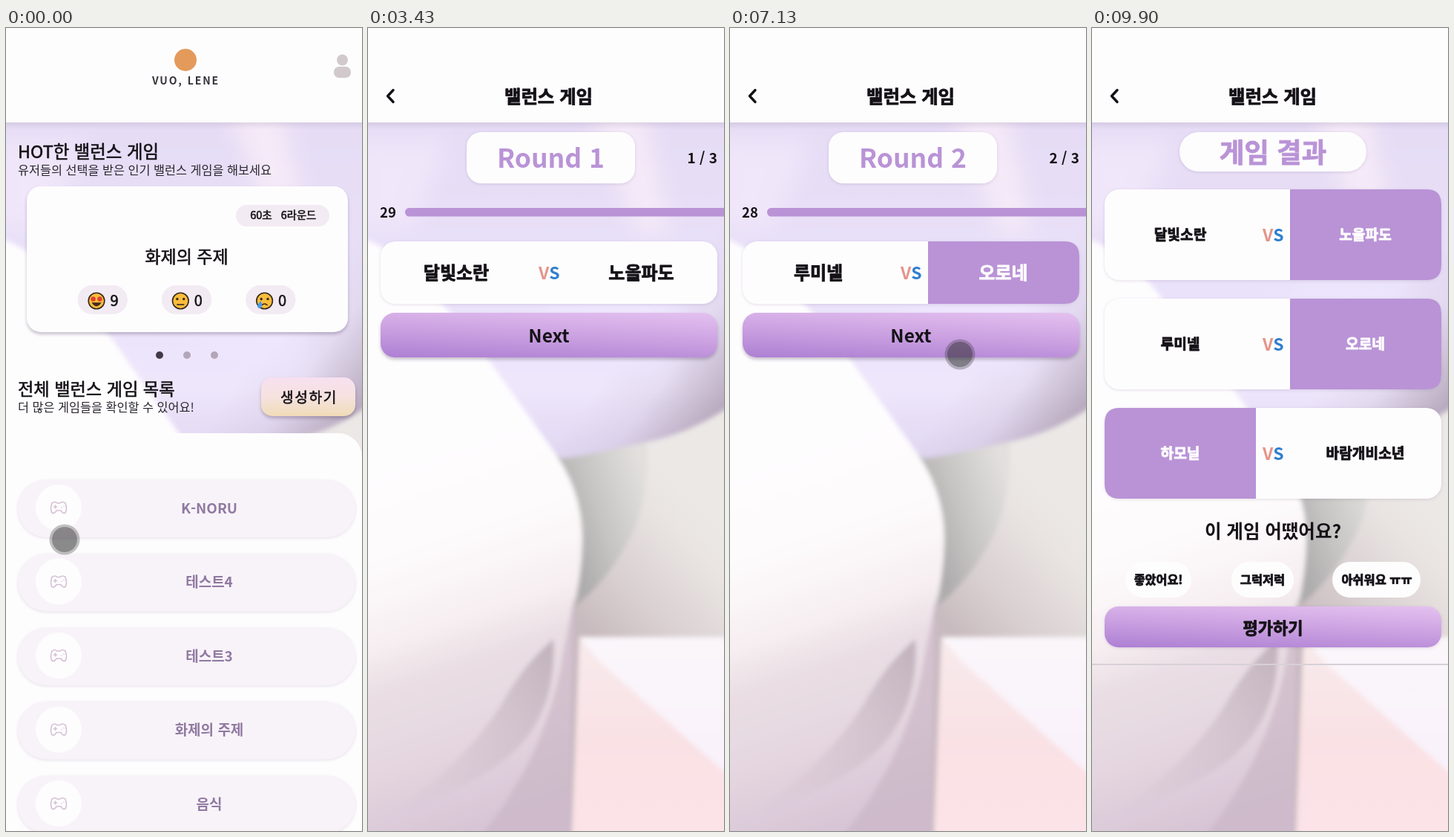
These frames come from a looping animation (480 by 1080 pixels, 9.93 s). An HTML page:

```html
<!DOCTYPE html>
<html lang="ko">
<head>
<meta charset="utf-8">
<title>밸런스 게임</title>
<style>
html, body { margin: 0; width: 100%; height: 100%; overflow: hidden; background: #fefdfe; }
svg { display: block; width: 100%; height: 100%; }
text { font-family: "Noto Sans CJK KR", "Noto Sans CJK", "Noto Sans", sans-serif; text-anchor: middle; white-space: pre; stroke-linejoin: round; }
.sh { filter: drop-shadow(0 1.5px 2px rgba(80, 50, 100, .15)); }
.deep { filter: drop-shadow(0 3px 2px rgba(60, 40, 80, .28)); }
</style>
</head>
<body>
<svg id="stage" viewBox="0 0 480 1080" preserveAspectRatio="none"></svg>
<script>
const LILAC = '#b993d6', MAUVE = '#9079a2', INK = '#151217', WHITE = '#fefdfe';
const LOOP = 9930;

// Drawing helpers
const rect = (x, y, x2, y2, r, fill, cls = '') =>
  `<rect x="${x}" y="${y}" width="${x2 - x}" height="${y2 - y}" rx="${r}" fill="${fill}" class="${cls}"/>`;
const circle = (x, y, r, fill, more = '') => `<circle cx="${x}" cy="${y}" r="${r}" fill="${fill}" ${more}/>`;
const path = (d, fill, more = '') => `<path d="${d}" fill="${fill}" ${more}/>`;
const line = (d, color, w, more = '') =>
  path(d, 'none', `stroke="${color}" stroke-width="${w}" stroke-linecap="round" stroke-linejoin="round" ${more}`);
// Medium and black weights get a thin outline, as only regular and bold exist
const OUTLINE = { 500: .6, 900: .8 };
const text = (s, x, cy, size, fill = INK, weight = 700, more = '') =>
  `<text x="${x}" y="${cy + size * .37}" font-size="${size}" fill="${fill}" font-weight="${weight}" ` +
  `stroke="${fill}" stroke-width="${OUTLINE[weight] || 0}" ${more}>${s}</text>`;
const LEFT = 'style="text-anchor:start"', RIGHT = 'style="text-anchor:end"';
const grad = (id, stops, dir = 'x2="0" y2="1"') => `<linearGradient id="${id}" ${dir}>` +
  stops.map(([o, c, a = 1]) => `<stop offset="${o}" stop-color="${c}" stop-opacity="${a}"/>`).join('') + '</linearGradient>';
const span = (x1, y1, x2, y2) => `gradientUnits="userSpaceOnUse" x1="${x1}" y1="${y1}" x2="${x2}" y2="${y2}"`;

const defs = `<defs>
  ${grad('btn', [[0, '#e4c1f0'], [.5, '#cba1e1'], [1, '#ad7fd3']], 'x1="1" y1="0" x2=".58" y2="1.2"')}
  ${grad('make', [[0, '#f7e0ef'], [.5, '#f6e2df'], [1, '#f0dcb8']])}
  ${grad('sky', [[0, '#e5dcf4'], [.45, '#e9e1f9'], [.8, '#eee6fb'], [1, '#e0d6f1']])}
  ${grad('edge', [[0, '#a393a6', 0], [.4, '#a393a6', .12], [1, '#a393a6', .8]], span(350, 430, 480, 530))}
  ${grad('wall', [[0, '#c8bbbf'], [.35, '#d9d0d1'], [.8, '#e9e4e2'], [1, '#ece8e6']], span(290, 800, 450, 650))}
  ${grad('grey', [[0, '#aeacad'], [.4, '#c5c4c2'], [.8, '#d8d7d4'], [1, '#e2dfdd']], span(268, 680, 385, 640))}
  ${grad('body', [[0, '#fefdfe'], [.25, '#fdfafb'], [.44, '#f7eff2'], [.56, '#eadfe4'], [.75, '#e5d7e0'], [1, '#d7c4d5']], span(0, 600, 160, 1075))}
  ${grad('leaf', [[0, '#b9a9b4', .85], [1, '#d8c8d5', .05]], 'x1="1" y1="0" x2="0" y2="1"')}
  ${grad('side', [[0, '#f8eaec'], [.5, '#f9e1e4'], [1, '#fbe3e8']])}
  ${grad('top', [[0, '#faf6fa'], [1, '#f9f1fb']])}
  ${grad('head', [[0, '#6a5878', .13], [1, '#6a5878', 0]])}
  <filter id="soft" x="-10%" y="-10%" width="120%" height="120%"><feGaussianBlur stdDeviation="3"/></filter>
  <filter id="haze" x="-60%" y="-60%" width="220%" height="220%"><feGaussianBlur stdDeviation="16"/></filter>
</defs>`;

// Soft shapes standing behind every page
const DOME = 'M-20 110 H500 V500 Q440 545 370 558 Q310 572 262 579 L-20 400Z';
const backdrop = rect(0, 0, 480, 1080, 0, 'url(#wall)') +
  `<g filter="url(#soft)">
  ${path('M240 560 L376 550 Q382 640 348 695 Q322 745 270 785Z', 'url(#grey)')}
  ${path(DOME, 'url(#sky)')}
  ${path(DOME, 'url(#edge)')}
  ${path('M-20 278 Q50 300 100 372 Q140 410 165 450 L245 562 Q290 620 289 690 Q288 740 276 785 L272 1100 H-20Z', 'url(#body)')}
  ${path('M250 822 Q210 855 180 910 Q130 990 20 1065 Q150 1020 200 970 Q255 915 250 822Z', 'url(#leaf)')}
  ${path('M278 765 L263 840 Q245 970 150 1090 H274 L280 820Z', '#c9b6c5', 'opacity=".65"')}
  </g>
  <g filter="url(#haze)">
  ${path('M300 110 H372 L405 275 H365Z', '#fbeff9', 'opacity=".75"')}
  ${path('M-20 150 H110 L60 270 H-20Z', '#f3e9fc', 'opacity=".8"')}
  ${path('M210 400 L300 330 L420 350 L400 480Z', '#efe8fe', 'opacity=".6"')}
  </g>
  <g filter="url(#soft)">
  ${path('M285 819 H500 V1100 H274Z', 'url(#side)')}
  ${path('M285 819 H500 V1018 L310 850Z', 'url(#top)')}
  </g>`;

const header = rect(0, 127, 480, 136, 0, 'url(#head)') + rect(0, 0, 480, 127, 0, WHITE);
const bar = (y, size, weight) => header + line(`M34 ${y - 8} L26.5 ${y} L34 ${y + 8}`, INK, 3.4) +
  text('밸런스 게임', 243.5, y + .5, size, INK, weight);

const MOUTHS = ['M-5 3 Q0 10 5 3Z', 'M-5 5 H5', 'M-4 6 Q0 2 4 6'];
function face(kind, x, y) {
  const eye = kind ? '#3b2a1c' : '#e2402f', r = kind ? 1.7 : 3.2;
  return `<g transform="translate(${x} ${y})">` +
    circle(0, 0, 10.8, '#f9bd3c', 'stroke="#33271f" stroke-width="1.6"') +
    circle(-4.4, -2.5, r, eye) + circle(4.4, -2.5, r, eye) +
    path(MOUTHS[kind], kind ? 'none' : '#5b2420', 'stroke="#3b2a1c" stroke-width="1.6"') +
    (kind === 2 ? path('M-5 0 Q-13 8 -7 10 Q-1 9 -5 0', '#4a9be8') : '') + '</g>';
}
const vote = (kind, x, cy, n) => rect(x, cy - 20, x + 67.5, cy + 19, 19.5, '#f3ebf3') +
  face(kind, x + 25.5, cy + 1) + text(n, x + 49.5, cy + 1, 20, INK, 500);

// Home
const gamepad = y => line('M-9 -6 Q-5 -9 -2 -6 H2 Q5 -9 9 -6 Q12 2 9 7 Q6 9 3 4 H-3 Q-6 9 -9 7 Q-12 2 -9 -6Z ' +
  'M-6.5 -1 H-2.5 M-4.5 -3 V1 M4 0 H4.1 M7 -2 H7.1', '#d5bfd5', 1.6, `transform="translate(71 ${y})"`);
const row = (name, i) => {
  const y = 608 + i * 99.5;
  return rect(16, y, 471, y + 77, 38.5, '#f8f3f8', 'sh') + circle(71, y + 37, 31, WHITE) +
    gamepad(y + 37) + text(name, 274, y + 37.5, 19, MAUVE);
};
const home = header +
  circle(242, 43, 15, '#e39a5b') + text('VUO, LENE', 242.5, 71, 14, '#35313a', 700, 'letter-spacing="1.9"') +
  circle(453.5, 43, 7.5, '#d2c9cd') + rect(442, 52, 465, 67, 7, '#d2c9cd') +
  text('HOT한 밸런스 게임', 16, 166, 23.4, INK, 500, LEFT) +
  text('유저들의 선택을 받은 인기 밸런스 게임을 해보세요', 16, 191, 16.3, '#2a2630', 400, LEFT) +
  rect(28, 213, 461, 409, 19, WHITE, 'deep') + rect(310, 238, 436, 267, 14.5, '#f3ebf3') +
  text('60초', 344, 252, 14.6, INK, 500) + text('6라운드', 394.5, 252, 14.3, INK, 500) +
  text('화제의 주제', 243.5, 307, 23, INK, 500) +
  [9, 0, 0].map((n, i) => vote(i, 96.5 + i * 113.3, 366, n)).join('') +
  [0, 1, 2].map(i => circle(207 + i * 37, 440, 5, i ? '#b2a6b8' : '#443a47')).join('') +
  text('전체 밸런스 게임 목록', 16, 485, 23.2, INK, 500, LEFT) +
  text('더 많은 게임들을 확인할 수 있어요!', 16, 510, 16.3, '#2a2630', 400, LEFT) +
  rect(344, 470, 471, 522, 15, 'url(#make)', 'deep') +
  text('생성하기', 408.5, 497, 19.2, INK, 500, 'letter-spacing="1.6"') +
  rect(0, 545, 480, 1140, 32, WHITE) +
  ['K-NORU', '테스트4', '테스트3', '화제의 주제', '음식'].map(row).join('');

// Game details
const pair = (y, a, b) => rect(17, y, 237, y + 50, 10, WHITE, 'sh') + rect(251, y, 471, y + 50, 10, WHITE, 'sh') +
  text(a, 126.5, y + 26, 21, MAUVE) + text(b, 360.5, y + 26, 21, MAUVE);
const detail = bar(87, 23, 500) +
  rect(17, 146, 471, 208, 10, LILAC, 'sh') + text('K-NORU', 244, 178, 21.5, WHITE) +
  pair(226, '3라운드', '30초') +
  rect(17, 294, 471, 358, 10, WHITE, 'sh') +
  [0, 1, 2].map(i => vote(i, 80 + i * 130.2, 327, 0)).join('') +
  text('게임을 준비하세요', 16, 390, 23, INK, 500, LEFT) +
  pair(424, '모키', 'nubbo') +
  rect(17, 499, 471, 565, 19, 'url(#btn)', 'sh') +
  text('시작하기', 244.5, 533, 22, WHITE, 700, 'letter-spacing="1.6"');

// Rounds and result
const ROUNDS = [
  { a: '달빛소란', b: '노을파도', pick: 1, start: 1830, chosen: 4330 },
  { a: '루미넬', b: '오로네', pick: 1, start: 5000, chosen: 6560 },
  { a: '하모닐', b: '바람개비소년', pick: 0, start: 7200, chosen: 8370 }
];
const half = (right, y, h) => right
  ? path(`M267 ${y} H451 q20 0 20 20 V${y + h - 20} q0 20 -20 20 H267Z`, LILAC)
  : path(`M221 ${y} H37 q-20 0 -20 20 V${y + h - 20} q0 20 20 20 H221Z`, LILAC);
function versus(r, y, h, size, picked) {
  const tone = side => picked && r.pick === side ? WHITE : INK, cy = y + h / 2;
  return rect(17, y, 471, y + h, 20, WHITE, 'sh') + (picked ? half(r.pick, y, h) : '') +
    text(r.a, 119, cy, size, tone(0), 900) + text(r.b, 368.5, cy, size, tone(1), 900) +
    text('V', 237, cy, 23, '#e5948a') + text('S', 251.5, cy, 23, '#2f7fcf');
}
function game(i, left, picked) {
  const full = left === 30;
  return bar(91.5, 24.4, 900) +
    rect(133, 140, 360, 209, 20, WHITE, 'sh') + text(`Round ${i + 1}`, 246.5, 175, 35.5, LILAC) +
    text(`${i + 1} / 3`, 471, 175, 19, INK, 700, RIGHT) +
    text(left, 16, 248, 18.5, INK, 700, LEFT) +
    rect(full ? 52 : 50, 242, full ? 475 : 500, 253.5, 5.5, LILAC) +
    versus(ROUNDS[i], 287, 84, 24, picked) +
    rect(17, 383, 471, 443, 19, 'url(#btn)', 'deep') +
    text(i < 2 ? 'Next' : '결과 확인', 244, 414, 24.4, INK, i < 2 ? 700 : 900);
}
const result = bar(91.5, 24.4, 900) +
  rect(118, 140, 370, 193, 26, WHITE, 'sh') + text('게임 결과', 244, 167, 36.5, LILAC, 900) +
  ROUNDS.map((r, i) => versus(r, 217 + i * 147, 122, 19.2, true)).join('') +
  text('이 게임 어땠어요?', 244, 677, 24.5) +
  rect(45, 718, 134, 766, 24, WHITE) + rect(188, 718, 272, 766, 24, WHITE) + rect(324, 718, 443, 766, 24, WHITE) +
  text('좋았어요!', 89.5, 742, 16.2, INK, 900) + text('그럭저럭', 230, 742, 16.4, INK, 900) +
  text('아쉬워요 ㅠㅠ', 384, 742, 16.4, INK, 900) +
  rect(17, 778, 471, 833, 19, 'url(#btn)', 'sh') + text('평가하기', 244, 807, 22, INK, 900) +
  rect(0, 855, 480, 857, 0, '#d8d0d7');

const stage = document.getElementById('stage');
stage.innerHTML = defs + backdrop + '<g id="page"></g><g id="touch">' +
  circle(0, 0, 20.5, 'rgba(50,50,50,.3)') + circle(0, 0, 17, 'rgba(30,30,30,.33)') + '</g>';
const page = document.getElementById('page'), touch = document.getElementById('touch');

// Pointer trips as [ms, x, y]; it is hidden between trips
const TRIPS = [
  [[0, 79, 688], [420, 120, 652], [560, 125, 650], [1000, 185, 600], [1500, 190, 540], [1870, 183, 520], [2030, 183, 535], [2615, 183, 535]],
  [[3700, 183, 535], [4250, 350, 335], [4450, 350, 335], [4850, 230, 425], [5010, 220, 430], [5350, 183, 535], [5700, 183, 535],
   [6400, 350, 335], [6700, 350, 335], [7080, 310, 439], [7250, 310, 439], [8180, 132, 327], [8400, 132, 327], [8650, 193, 436], [9285, 193, 436]]
];
function pointer(t) {
  const trip = TRIPS.find(p => t >= p[0][0] && t < p[p.length - 1][0]);
  if (!trip) return null;
  const i = trip.findIndex(p => p[0] > t), [t0, x0, y0] = trip[i - 1], [t1, x1, y1] = trip[i];
  const u = (t - t0) / (t1 - t0), e = u * u * (3 - 2 * u);
  return [x0 + (x1 - x0) * e, y0 + (y1 - y0) * e];
}

function view(t) {
  if (t < 560) return ['home', () => home];
  if (t < 2060) return ['detail', () => detail];
  if (t >= 8720) return ['result', () => result];
  const i = t < ROUNDS[1].start ? 0 : t < ROUNDS[2].start ? 1 : 2, r = ROUNDS[i];
  const left = 30 - Math.floor((t - r.start) / 1000), picked = t >= r.chosen;
  return [`${i} ${left} ${picked}`, () => game(i, left, picked)];
}

let shown;
const begin = performance.now();
function draw() {
  const t = (performance.now() - begin) % LOOP, [key, make] = view(t), at = pointer(t);
  if (key !== shown) {
    page.innerHTML = make();
    shown = key;
  }
  touch.style.display = at ? '' : 'none';
  if (at) touch.setAttribute('transform', `translate(${at[0]} ${at[1]})`);
  requestAnimationFrame(draw);
}
draw();
</script>
</body>
</html>
```
